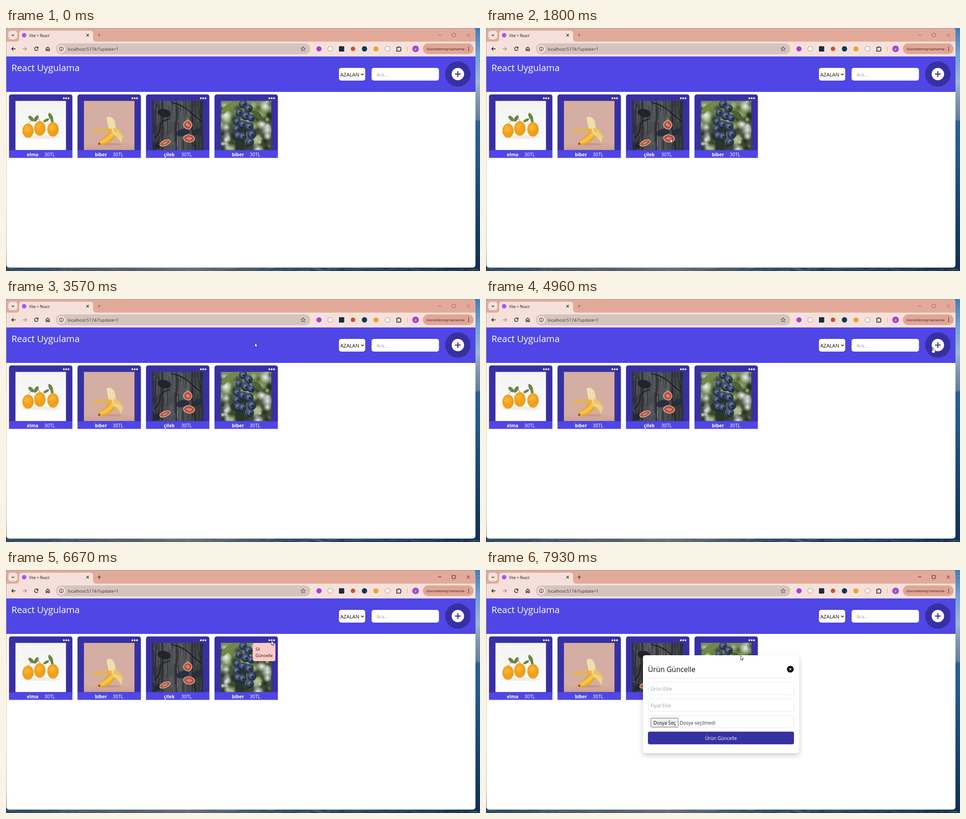
Recreate the animation shown at these times as an HTML page with a canvas. Size 1045 by 536 pixels, loop 8000 ms.

```html
<!DOCTYPE html>
<html lang="tr">
<head>
<meta charset="utf-8">
<title>React Uygulama</title>
<style>
html, body { margin: 0; width: 100%; height: 100%; overflow: hidden; background: #fff; }
canvas { display: block; }
</style>
</head>
<body>
<canvas id="stage" width="1045" height="536"></canvas>
<script>
const W = 1045, H = 536, LOOP = 8000;
const INDIGO = '#4f46e5', DEEP = '#3730a3', INK = '#1f1a19', BAR = '#f6e1da', ROSE = '#e3aa99';
const FONT = '"Open Sans", "Noto Sans", sans-serif';
const view = document.getElementById('stage').getContext('2d');
let g = view;

function layer(draw) {
  const c = document.createElement('canvas');
  c.width = W; c.height = H;
  g = c.getContext('2d');
  draw();
  g = view;
  return c;
}
function box(x, y, w, h, color, r = 0) {
  g.fillStyle = color;
  g.beginPath();
  g.roundRect(x, y, w, h, r);
  g.fill();
}
function frame(x, y, w, h, color, r = 0) {
  g.strokeStyle = color; g.lineWidth = 1;
  g.beginPath();
  g.roundRect(x, y, w, h, r);
  g.stroke();
}
function oval(x, y, rx, ry, color, turn = 0) {
  g.fillStyle = color;
  g.beginPath();
  g.ellipse(x, y, rx, ry, turn, 0, 7);
  g.fill();
}
const dot = (x, y, r, color) => oval(x, y, r, r, color);
function shape(d, color) { g.fillStyle = color; g.fill(new Path2D(d)); }
function line(d, color, width = 1) {
  g.strokeStyle = color; g.lineWidth = width;
  g.stroke(new Path2D(d));
}
function text(s, x, y, size, color, weight = 400, align = 'left') {
  g.font = `${weight} ${size}px ${FONT}`;
  g.fillStyle = color; g.textAlign = align;
  g.fillText(s, x, y);
}
function blob(x, y, r, color) {
  const f = g.createRadialGradient(x, y, 0, x, y, r);
  f.addColorStop(0, color);
  f.addColorStop(1, color + '00');
  g.fillStyle = f;
  g.fillRect(x - r, y - r, 2 * r, 2 * r);
}
function fade(x, y, w, h, stops, across = false) {
  const f = g.createLinearGradient(x, y, across ? x + w : x, across ? y : y + h);
  for (const [at, color] of stops) f.addColorStop(at, color);
  g.fillStyle = f;
  g.fillRect(x, y, w, h);
}
function random(seed) {
  return () => (seed = (seed * 16807) % 2147483647) / 2147483647;
}

function backdrop() {
  box(0, 0, W, H, '#8fa3b8');
  fade(1034, 0, 11, H, [[0, '#3f7dbd'], [.1, '#6d9fd2'], [.22, '#9db7d4'], [.3, '#7d93ad'], [.375, '#62809f'],
    [.385, '#2a5f96'], [.5, '#245a93'], [.75, '#17436f'], [1, '#102f50']]);
  fade(0, 0, 1, H, [[0, '#8aa4c0'], [.4, '#d8c48a'], [.6, '#e3cf8d'], [.9, '#c7b075'], [1, '#2a4a6c']]);
  fade(0, 524, W, 12, [[0, '#2c4660'], [.2, '#4c5b69'], [.4, '#5f6a73'], [.6, '#2b4560'], [1, '#14304e']], true);
  const rnd = random(77);
  for (let i = 0; i < 90; i++) box(rnd() * W, 529 + rnd() * 6, 8 + rnd() * 25, 1.2, 'rgba(150,170,185,.22)');
}

function chrome() {
  box(1, 1, 1034, 527.5, '#fff', 6);
  box(1, 1, 1034, 40, ROSE, [6, 6, 0, 0]);
  box(1, 30, 1034, 33, BAR);
  // tab strip
  box(5, 6, 20, 19, BAR, 6);
  line('M12.7 14.6L15.2 17L17.7 14.6', INK, 1.3);
  shape('M22 30Q29 30 29 23V12Q29 6 35 6H186Q192 6 192 12V23Q192 30 199 30Z', BAR);
  dot(40, 16, 5, '#9c5cf4');
  text('Vite + React', 51, 19.5, 8.3, INK);
  line('M177.3 13.2L182.7 18.6M182.7 13.2L177.3 18.6', INK, 1.2);
  // navigation
  line('M21 46H13M16.4 42.2L12.6 46L16.4 49.8', INK, 1.4);
  line('M37 46H45M41.6 42.2L45.4 46L41.6 49.8', '#a08f8a', 1.4);
  line('M70 43.3A3.9 3.9 0 1 0 70.6 47', INK, 1.4);
  shape('M71.3 41V45.2H67.1Z', INK);
  line('M88.2 45V50.2H90.7V47H93.3V50.2H95.8V45L92 41.9Z', INK, 1.3);
  box(110, 34, 561, 24, '#d5c3be', 12);
  dot(122, 46, 8.5, BAR);
  g.strokeStyle = INK; g.lineWidth = 1.1;
  g.beginPath(); g.arc(122, 46, 4.3, 0, 7); g.stroke();
  line('M122 45.4V48.4M122 43.4V44.5', INK, 1.1);
  text('localhost:5174/?update=1', 136, 49.6, 9.4, '#3b3230');
  let star = '';
  for (let i = 0; i < 10; i++) {
    const r = i % 2 ? 2.3 : 5.2, a = i * Math.PI / 5;
    star += (i ? 'L' : 'M') + (655 + r * Math.sin(a)) + ' ' + (46.3 - r * Math.cos(a));
  }
  line(star + 'Z', '#4a403d', 1);
  // extensions
  dot(690, 46, 5.8, '#a63fd8');
  box(734, 40.3, 11.6, 11.6, '#1b2a3e', 1);
  dot(765, 46, 5, '#cf4f31');
  dot(790.3, 46, 5.9, '#12355b');
  dot(815.6, 46, 5.6, '#e8a038');
  for (const x of [715, 841]) { dot(x, 46, 5.8, '#77706e'); dot(x, 46, 5.1, '#fbf7f5'); }
  line('M861.3 42.8H864.3A1.5 1.5 0 0 1 867.3 42.8H870V45A1.6 1.6 0 0 1 870 48.1V51H861.3V48.2A1.6 1.6 0 0 0 861.3 45.2Z', INK, 1.4);
  box(884, 41, 1, 10, '#e0a897');
  dot(903, 46, 7.3, '#a845d0');
  text('e', 903, 48.9, 8, '#fff', 400, 'center');
  box(919, 34, 112, 23.5, '#e0a695', 12);
  text('Güncellemeyi tamamla', 927, 48.8, 7.85, '#2c1b17');
  for (const y of [42, 45.7, 49.4]) dot(1020, y, 1.05, INK);
}

function controls(color) {
  line('M201.5 15.7H209.5M205.5 11.7V19.7', color, 1.1);
  line('M952.3 15.5H959.7', color, 1);
  frame(983.5, 11.9, 7.2, 7.2, color, .8);
  line('M1015.8 12.2L1022.8 19.2M1022.8 12.2L1015.8 19.2', color, 1);
}

function header() {
  box(1, 62.7, 1034, 78.3, INDIGO);
  text('React Uygulama', 12, 94.8, 20, '#fff');
  box(734, 88, 58, 28, '#fff', 5);
  text('AZALAN', 737, 106.8, 11.2, '#111');
  line('M782.8 100.8L785.6 103.6L788.4 100.8', '#111', 1.4);
  box(806, 88, 148.5, 28, '#fff', 5);
  text('Ara...', 817, 106.8, 10.5, '#9ca3af');
  dot(996.2, 101.6, 28, DEEP);
  dot(996.2, 101.6, 13.7, '#fff');
  line('M989.8 101.6H1002.6M996.2 95.2V108', DEEP, 2.3);
}

function oranges() {
  fade(0, 0, 112, 109, [[0, '#f3f4f1'], [.6, '#fafaf9'], [1, '#ffffff']]);
  oval(56, 80, 42, 4, '#f1ece5');
  line('M28 51Q32 45 37 42M55 46Q52 40 49 37M82 50Q81 40 78 34', '#8a8254', 1);
  for (const [x, y, rx, ry, t] of [[35, 39, 8, 4, .75], [46, 39, 8, 4, -1], [68, 43, 7, 3, -.5], [78, 35, 9, 4, 1.1], [81, 44, 6, 3, 1.4]])
    oval(x, y, rx, ry, '#6d8449', t);
  for (const [x, y, h] of [[28, 66, 15.5], [54, 61, 16], [83, 63, 16]]) {
    oval(x, y, 12.6, h, '#ee9f1c');
    blob(x - 2, y - 4, 11, '#ffbb3a');
  }
}

function banana() {
  fade(0, 0, 112, 109, [[0, '#d4aea3'], [.85, '#d5ada2'], [1, '#cda094']]);
  oval(58, 96, 26, 3, '#c49a8c');
  shape('M31 91Q29 99 38 98Q60 95 70 78L77 62L60 62Q48 80 31 91Z', '#e9a92b');
  shape('M36 89Q55 81 63 65L70 68Q60 90 38 95Z', '#f5c24a');
  shape('M55 64Q51 45 50 37Q59 31 67 43Q72 57 69 70Z', '#eedfae');
  shape('M62 62Q42 58 17 69Q25 75 36 68Q50 65 61 69Z', '#e8b446');
  shape('M64 59Q80 62 86 78Q84 88 82 94Q77 80 64 74Z', '#ecd38a');
  shape('M65 60Q84 65 86 80Q78 70 66 68Z', '#f0c25a');
  dot(34, 95, 2.2, '#6a4a2a');
}

function figs() {
  fade(0, 0, 112, 109, [[0, '#2b2d31'], [.25, '#4b4e52'], [.6, '#54575a'], [1, '#2b2e32']], true);
  const rnd = random(421);
  for (let i = 0; i < 170; i++) {
    const tone = 15 + rnd() * 115 | 0;
    box(rnd() * 112, rnd() * 120 - 20, .6 + rnd() * 1.5, 8 + rnd() * 38, `rgba(${tone},${tone + 2},${tone + 5},.6)`);
  }
  for (const x of [21, 52, 87]) box(x, 0, 1.5, 109, '#15171a');
  line('M42 4Q66 8 83 24T110 46M4 83Q17 72 17 58T38 40', '#1d1b1a', 2);
  oval(26, 27, 15, 9, '#22232d', .2);
  oval(67, 70, 15, 8, '#2a2f40', -.2);
  oval(99, 68, 13, 7, '#2a2d3a', -.4);
  oval(12, 99, 7, 7, '#242431');
  shape('M77 39L81 39L86 50L70 50Z', '#8d6f5c');
  for (const [x, y, rx, ry, t] of [[78, 53, 10, 10, .6], [81, 83, 13, 9, .1], [28, 93, 13, 6.5, -.4]]) {
    oval(x, y, rx, ry, '#d6b59c', t);
    oval(x, y, rx - 1.7, ry - 1.7, '#b3503f', t);
    oval(x, y, rx * .5, ry * .35, '#d9806a', t);
  }
}

function berries() {
  fade(0, 0, 112, 109, [[0, '#7d9160'], [.5, '#4c5c3e'], [1, '#3c4736']]);
  const rnd = random(95), tones = ['#a9bd80', '#2c3826', '#e6e8e2', '#6d8549', '#222c20'];
  for (let i = 0; i < 90; i++) blob(rnd() * 112, rnd() * 109, 5 + rnd() * 10, tones[i % 5]);
  for (const [x, y, r] of [[12, 32, 13], [98, 12, 14], [90, 52, 12], [12, 58, 10], [103, 78, 9]]) blob(x, y, r, '#eceee9');
  shape('M0 22Q14 2 33 0H40Q25 12 6 30Z', '#6d8a42');
  shape('M34 109Q28 76 39 55L57 62L51 109Z', '#27352b');
  shape('M66 22Q88 18 94 44Q78 42 66 22Z', '#4a6336');
  const spots = [[49, 7, 9], [61, 17, 9], [40, 26, 8], [55, 33, 10], [67, 38, 8], [36, 46, 8],
    [48, 52, 9], [62, 57, 10], [35, 62, 8], [38, 77, 9], [68, 74, 10], [64, 91, 9], [48, 79, 9]];
  for (const [x, y, r] of spots) {
    dot(x, y, r, '#1f2940');
    blob(x - 1, y - 2, r, '#7089b2');
    dot(x + 2, y + 1, r * .25, '#1c2438');
  }
}

function cards() {
  const items = [['elma', 46, oranges], ['biber', 196, banana], ['çilek', 348, figs], ['biber', 498, berries]];
  items.forEach(([name, x, photo], i) => {
    const left = 6.6 + 151 * i;
    box(left, 146.6, 139.8, 123.4, DEEP, [5, 5, 0, 0]);
    for (const d of [121, 126.1, 131.2]) dot(left + d, 155, 1.9, '#fff');
    g.save();
    g.translate(left + 14, 160.6);
    g.beginPath(); g.rect(0, 0, 111.8, 108.9); g.clip();
    photo();
    g.restore();
    box(left, 269.5, 139.8, 17, INDIGO);
    text(name, x, 282.6, 10.2, '#fff', 700);
    text('30TL', 84.3 + 151 * i, 282.6, 10.6, '#fff');
  });
}

function menu() {
  box(544, 161, 50, 40, '#fecaca', 4);
  text('Sil', 550, 178, 9.4, '#1a1212');
  text('Güncelle', 550, 192, 9.4, '#1a1212');
}

function modal() {
  g.save();
  g.shadowColor = 'rgba(0,0,0,.2)'; g.shadowBlur = 12; g.shadowOffsetY = 5;
  box(346, 188, 344.5, 216, '#fff', 5);
  g.restore();
  text('Ürün Güncelle', 357, 225.3, 15.7, '#111');
  dot(670.9, 218.8, 7.4, '#000');
  line('M668.6 216.5L673.2 221.1M673.2 216.5L668.6 221.1', '#fff', 1.2);
  box(357, 238, 322, 1, '#e5e7eb');
  for (const y of [247.5, 284, 320.5]) frame(357.5, y, 321.5, 27.5, '#e5e7eb', 4);
  text('Ürün Ekle', 363, 266.3, 10.45, '#9ca3af');
  text('Fiyat Ekle', 363, 302.8, 10.45, '#9ca3af');
  box(363, 326, 61.5, 21, '#efefef', 2);
  frame(363.5, 326.5, 60.5, 20, '#767676', 2);
  text('Dosya Seç', 369, 340.6, 10.5, '#111');
  text('Dosya seçilmedi', 427, 340.6, 10.5, '#333');
  box(357, 356.5, 322, 28, DEEP, 4);
  text('Ürün Güncelle', 518, 374.5, 10.5, '#fff', 400, 'center');
}

// start, end, steps, way points; "gone" hides the pointer at the end
const moves = [
  { a: 400, b: 1150, n: 12, way: [[951, 528], [620, 300], [291, 68], [138, -4]], gone: true },
  { a: 1800, b: 1870, n: 1, way: [[406, 244]], gone: true },
  { a: 2060, b: 2540, n: 7, way: [[521, 90], [348, 62], [45, 6]], gone: true },
  { a: 2740, b: 2890, n: 1, way: [[-6, 215]] },
  { a: 2890, b: 3570, n: 11, way: [[0, 216], [348, 62], [640, 3], [653, 20], [548.5, 96.5]] },
  { a: 3690, b: 3690, n: 1, way: [[548, 102]] },
  { a: 3770, b: 3890, n: 3, way: [[563, 116], [595, 144]] },
  { a: 4040, b: 4840, n: 12, way: [[598, 150], [625, 156], [718, 135], [850, 104], [915, 92], [963, 96]] },
  { a: 4910, b: 4960, n: 2, way: [[970, 100], [985, 106.5]] },
  { a: 5030, b: 5160, n: 3, way: [[988, 106], [995, 104]] },
  { a: 5510, b: 6110, n: 10, way: [[985, 107], [800, 130], [650, 152], [588, 158]] },
  { a: 6380, b: 6670, n: 4, way: [[587, 157], [585, 156]] },
  { a: 6730, b: 6860, n: 3, way: [[585, 157], [586, 158]] },
  { a: 7060, b: 7600, n: 8, way: [[584, 163], [571, 180], [556, 194], [561, 188.5]] }
];

function pointer(t) {
  const m = moves.filter(v => v.a <= t).pop();
  if (!m) return null;
  const last = m.way.length - 1;
  if (t >= m.b) return m.gone ? null : m.way[last];
  const step = Math.floor((t - m.a) / (m.b - m.a) * (m.n - 1) + 1e-6);
  const p = step / Math.max(1, m.n - 1) * last, i = Math.floor(p);
  const from = m.way[i], to = m.way[Math.min(i + 1, last)];
  return from.map((v, k) => v + (to[k] - v) * (p - i));
}

function drawPointer([x, y]) {
  const hand = Math.hypot(x - 996, y - 101.6) < 28;
  g.save();
  g.translate(x, y);
  g.lineJoin = 'round';
  const d = hand
    ? 'M-1.2 1Q0 -.8 1.2 1V4.6L4.4 5.4Q5.8 6 5.5 8L4.6 12.5H-.8L-3.6 8.6Q-3.6 7 -2.2 7.6L-1.2 8.8Z'
    : 'M0 0V9.8L2.2 7.8L3.7 11L5.2 10.3L3.8 7.2H6.9Z';
  shape(d, '#fff');
  line(d, '#111', .8);
  if (hand) line('M1.2 6.8V9M2.8 7V9', '#555', .5);
  g.restore();
}

const back = layer(() => { backdrop(); chrome(); header(); cards(); });

function render(t) {
  const within = (a, b) => t >= a && t < b;
  g.drawImage(back, 0, 0);
  controls(t < 6480 ? '#8b6a61' : INK);
  if (within(6600, 7930)) menu();
  if (t >= 7930) modal();
  const at = pointer(t);
  if (at && (within(6480, 6600) || within(7800, 7930))) dot(at[0], at[1], 8.5, 'rgba(250,220,40,.6)');
  if (at) drawPointer(at);
}

const began = performance.now();
function tick() {
  render((performance.now() - began) % LOOP);
  requestAnimationFrame(tick);
}
tick();
</script>
</body>
</html>
```
